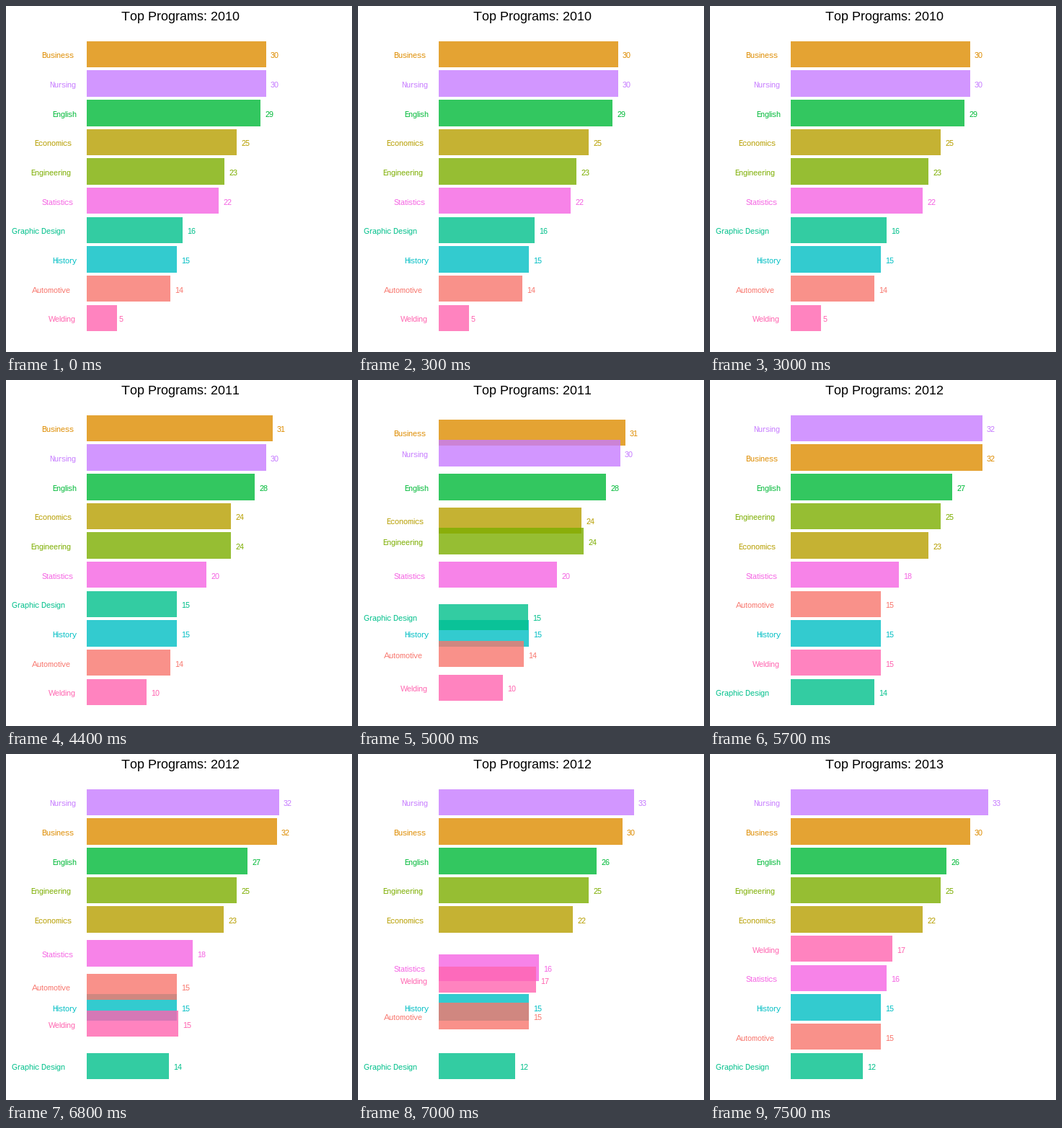
A matplotlib script for the animation above (8 s loop, 480 by 480 pixels).

```python
from math import cos, radians, sin

import matplotlib.pyplot as plt
from matplotlib.animation import FuncAnimation
from matplotlib.patches import Rectangle

SIZE, DPI = 480, 72     # at 72 dpi one point is one pixel
FRAMES, INTERVAL = 80, 100

plt.rcParams.update({
    "font.family": "Liberation Sans",
    "text.hinting": "native",
    "text.hinting_factor": 1,
    "text.kerning_factor": 6,
})

# Bar geometry in pixels, measured from the top left
LEFT, UNIT = 112, 8.314
TOP, PITCH, HEIGHT = 48.6, 40.659, 36.6
BASELINE = HEIGHT / 2 + 5.5

FIRST_YEAR = 2010
START, STEPS, PERIOD = 29, 9, 18    # a change, then an equal rest

# name: hue slot, value per year; hundredths only break ties.
# Listed from back to front.
PROGRAMS = {
    "Business": (1, (30, 31, 32, 30)),
    "Economics": (2, (25, 24, 23, 22)),
    "English": (4, (29, 28, 27, 26)),
    "History": (6, (15, 15, 15, 15)),
    "Nursing": (9, (30, 30, 32.01, 33)),
    "Engineering": (3, (23, 24, 25, 25)),
    "Statistics": (10, (22, 20, 18, 16)),
    "Welding": (11, (5, 10, 15, 17)),
    "Automotive": (0, (14, 14, 15.01, 15)),
    "Graphic Design": (5, (16, 15.01, 14, 12)),
}
CHANGES = 3


def hue_color(slot, slots=12, chroma=100, light=65):
    """Evenly spaced hue of equal lightness, CIE LUV to sRGB."""
    angle = radians(15 + 360 * slot / slots)
    u = chroma * cos(angle) / (13 * light) + 0.19784
    v = chroma * sin(angle) / (13 * light) + 0.46834
    y = ((light + 16) / 116) ** 3
    x = 9 * y * u / (4 * v)
    z = 3 * y / v - 5 * y - x / 3
    linear = (3.240479 * x - 1.537150 * y - 0.498535 * z,
              -0.969256 * x + 1.875992 * y + 0.041556 * z,
              0.055648 * x - 0.204043 * y + 1.057311 * z)
    return [min(1.055 * max(c, 0.0031) ** (1 / 2.4) - 0.055, 1)
            if c > 0.00304 else max(12.92 * c, 0) for c in linear]


def ranking(year):
    """Row of each program, largest value on top."""
    order = sorted(PROGRAMS, key=lambda name: -PROGRAMS[name][1][year])
    return {name: row for row, name in enumerate(order)}


def ease(t):
    return 4 * t ** 3 if t < 0.5 else 1 - 4 * (1 - t) ** 3


def phase(frame):
    """Index of the current change and the steps done in it."""
    since = max(frame - START, 0)
    index = min(since // PERIOD, CHANGES - 1)
    return index, min(since - index * PERIOD, STEPS)


fig = plt.figure(figsize=(SIZE / DPI, SIZE / DPI), dpi=DPI, facecolor="white")
ax = fig.add_axes((0, 0, 1, 1))
ax.set(xlim=(0, SIZE), ylim=(SIZE, 0))
ax.axis("off")

title = ax.text(241.5, 20, "", fontsize=18, ha="center", va="baseline")


class Row:
    def __init__(self, name, slot, values, rows):
        self.values, self.rows = values, rows
        color = hue_color(slot)
        style = dict(color=color, fontsize=11, va="baseline", zorder=3)
        self.bar = ax.add_patch(Rectangle((LEFT, 0), 0, 0, facecolor=color,
                                          alpha=0.8, linewidth=0))
        self.label = ax.text(0, 0, name, ha="left", **style)
        self.number = ax.text(0, 0, "", ha="left", **style)
        # The gap to the bar grows with the label's own width
        width = self.label.get_window_extent().width
        self.label.set_x(round(LEFT - 1.4 * width))

    def place(self, index, p):
        def mix(pair):
            return pair[index] + (pair[index + 1] - pair[index]) * p

        end = LEFT + UNIT * mix(self.values)
        top = TOP + PITCH * mix(self.rows)
        y = round(top)
        self.bar.set_bounds(LEFT, y, round(end) - LEFT,
                            round(top + HEIGHT) - y)

        base = round(top + BASELINE)
        text = str(round(self.values[index + (p > 0.5)]))
        self.label.set_y(base)
        self.number.set_text(text)
        self.number.set_position((round(end + 3 * len(text)), base))


ranks = [ranking(year) for year in range(CHANGES + 1)]
chart = [Row(name, slot, values, [rank[name] for rank in ranks])
         for name, (slot, values) in PROGRAMS.items()]


def draw(frame):
    index, step = phase(frame)
    p = ease(step / STEPS)
    for row in chart:
        row.place(index, p)
    # The year turns over one step after the numbers
    year = FIRST_YEAR + index + (step > 5)
    title.set_text(f"Top Programs: {year}")
    return []


anim = FuncAnimation(fig, draw, frames=FRAMES, interval=INTERVAL,
                     repeat=True, repeat_delay=0, blit=False)
plt.show()
```
